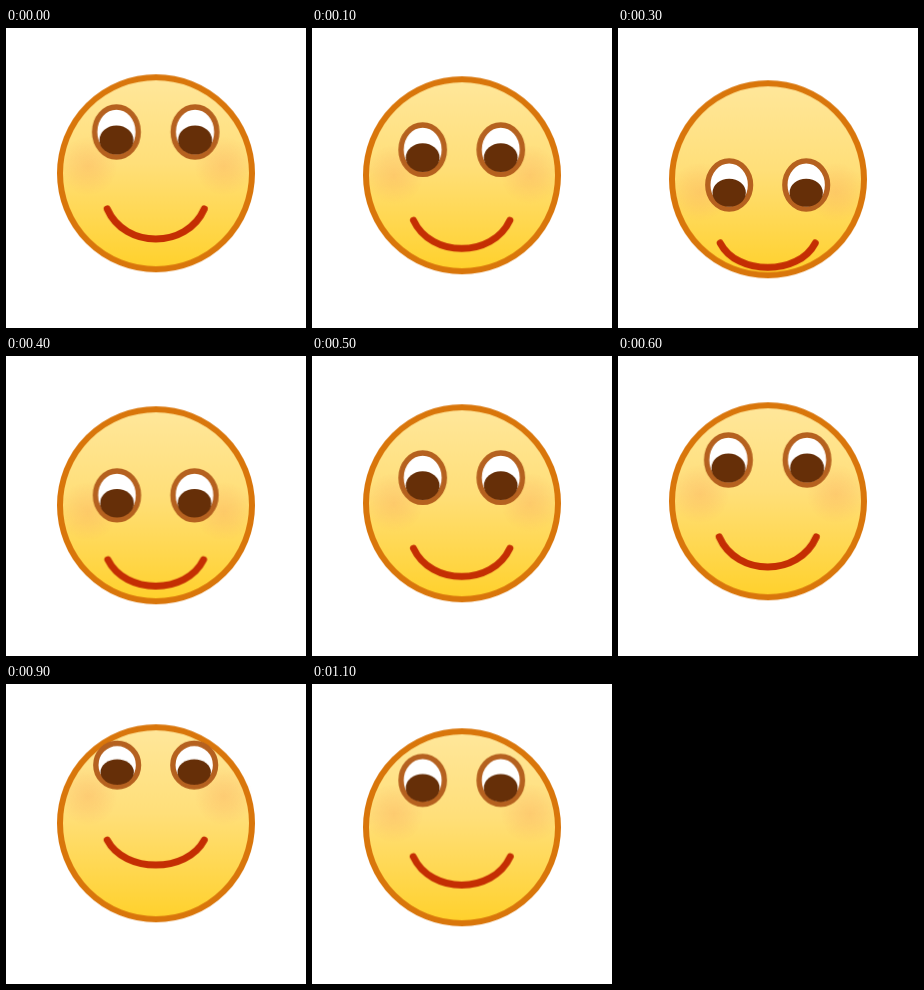
An HTML page that plays this animation: 300x300 px, repeating every 1.2 s.

```html
<!DOCTYPE html>
<html lang="en">
<head>
<meta charset="utf-8">
<title>Nodding smiley</title>
<style>
  html, body { margin: 0; width: 100%; height: 100%; overflow: hidden; background: #fff; }
  svg { display: block; width: 100vw; height: 100vh; }

  /* Each quarter of the nod is three even, hard steps. */
  .part {
    transform: var(--rest);
    animation: nod 1200ms steps(3, end) infinite;
  }
  @keyframes nod {
    0%, 50%, 100% { transform: var(--rest); }
    25% { transform: var(--down); }
    75% { transform: var(--up); }
  }

  .face {
    --rest: translate(150px, 145.3px);
    --down: translate(150px, 151.3px);
    --up: translate(150px, 139.3px);
  }
  .blush {
    --rest: translate(150px, 138px);
    --down: translate(150px, 164px);
    --up: translate(150px, 112px);
  }
  .eyes {
    --rest: translate(149.7px, 104px) scale(1, 1);
    --down: translate(149.7px, 157px) scale(.98, .965);
    --up: translate(149.7px, 81px) scale(.98, .87);
  }
  .mouth {
    --rest: translate(149.7px, 181px) scale(1, 1);
    --down: translate(149.7px, 215px) scale(.98, .82);
    --up: translate(149.7px, 156px) scale(1, .83);
  }

  .rim { fill: none; stroke: #d9760b; stroke-width: 6; }
  .socket { fill: #fff; stroke: #b5611f; stroke-width: 5.4; }
  .pupil { fill: #662f08; }
  .smile { fill: none; stroke: #c42e03; stroke-width: 7; stroke-linecap: round; }
  .socket, .smile { vector-effect: non-scaling-stroke; }
</style>
</head>
<body>
<svg viewBox="0 0 300 300">
  <defs>
    <linearGradient id="skin" x1="0" y1="0" x2="0" y2="1">
      <stop offset="0" stop-color="#ffe79b"/>
      <stop offset=".45" stop-color="#ffdf79"/>
      <stop offset="1" stop-color="#ffd12b"/>
    </linearGradient>
    <radialGradient id="glow">
      <stop offset="0" stop-color="#fbb062" stop-opacity=".42"/>
      <stop offset=".5" stop-color="#fbb062" stop-opacity=".24"/>
      <stop offset="1" stop-color="#fbb062" stop-opacity="0"/>
    </radialGradient>
    <g id="eye">
      <ellipse class="socket" rx="21.8" ry="25"/>
      <ellipse class="pupil" cy="8" rx="17" ry="14.6"/>
    </g>
  </defs>

  <g class="part face"><circle r="96" fill="url(#skin)"/></g>
  <g class="part blush" fill="url(#glow)">
    <circle cx="-68" r="29"/>
    <circle cx="68" r="29"/>
  </g>
  <g class="part face"><circle class="rim" r="96"/></g>
  <g class="part eyes">
    <use href="#eye" x="-39.3"/>
    <use href="#eye" x="39.3"/>
  </g>
  <g class="part mouth">
    <path class="smile" d="M-48.5 0C-31 40 31 40 48.5 0"/>
  </g>
</svg>
</body>
</html>
```
